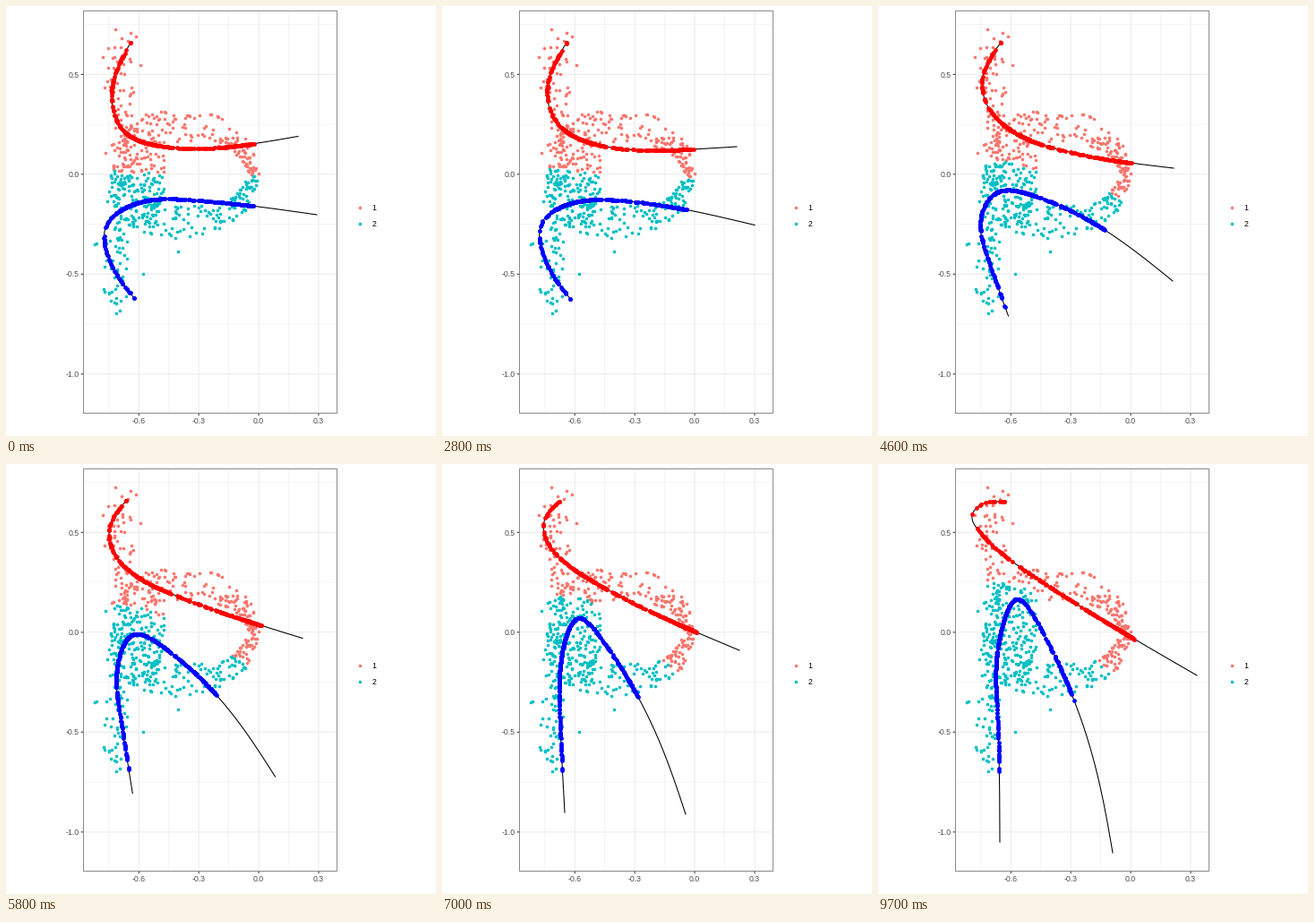
Recreate the animation shown at these times as a matplotlib script. Size 480 by 480 pixels, loop 10000 ms.

```python
import matplotlib.pyplot as plt
import numpy as np
from matplotlib.animation import FuncAnimation

SIZE, DPI = 480, 96
PX = 72 / DPI                       # points per pixel
X0, Y0, UNIT = 282.1, 187.8, 223.0  # pixel position of (0, 0), pixels per unit
LEFT, RIGHT, TOP, BOTTOM = 86.5, 369.5, 5.5, 454.5
GROUPS = [("#F8766D", "#FF0000"), ("#00BFC4", "#0000FF")]

# Progress through the poses against the iteration, settling at the end
STEPS = [0, 7, 12, 20, 24, 26, 29]
PROGRESS = [0, 1, 2, 3, 3.85, 3.98, 4]

# Knots of the two curves in each pose, in pixels
UPPER = np.array([
    [(139, 41), (118, 95), (131, 139), (174, 156.5), (245, 157.5), (326, 145.5)],
    [(139, 41), (117.5, 92), (128, 130), (165, 152.5), (235, 161), (329, 157)],
    [(137, 41), (117, 78), (121, 109), (146, 137), (205, 161), (330, 181)],
    [(131, 41.5), (115, 61), (113.5, 75), (125, 98), (165, 129), (332, 208)],
    [(141, 42), (111, 48), (105, 58), (112, 74), (160, 116), (356, 236)],
])
LOWER = np.array([
    [(143, 326), (115, 283), (112, 245), (140, 222), (200, 216), (347, 233)],
    [(145, 329), (114, 281), (112, 241), (138, 222), (190, 216.5), (349, 244.5)],
    [(145.5, 346), (122, 280), (116, 231), (131, 209), (172, 211), (329, 307)],
    [(137, 389), (131, 270), (134, 212), (152, 172), (180, 198), (272, 391)],
    [(136, 422), (133, 275), (137, 188), (155, 151), (180, 181), (262, 434)],
])
OUTLIERS = [(122, 26), (145, 34), (150, 66), (99, 266), (101, 265),
            (153, 299), (192, 274), (282, 187), (123, 343)]


def observations(seed=3):
    """A tall strip, a dense core beside it and a ring that narrows to a tip."""
    rng = np.random.default_rng(seed)
    n = 165
    v = rng.uniform(-1, 1, n)
    strip = np.c_[127 - 4 * v**2 + 8 * rng.normal(size=n).clip(-2, 2),
                  185 + 155 * v]
    n = 200
    r, a = np.sqrt(rng.random(n)), rng.uniform(0, 2 * np.pi, n)
    core = np.c_[147 + 31 * r * np.cos(a), 192 + 62 * r * np.sin(a)]
    n = 270
    a = rng.uniform(-2.2, 2.2, n)
    r = 0.97 + rng.uniform(-1, 1, n) * (0.07 + 0.28 * np.sin(a)**2)
    ring = np.c_[195 + 82 * r * np.cos(a), 187 + 55 * r * np.sin(a)]
    return np.vstack([strip, core, ring, OUTLIERS])


def spline(p, n=700):
    """Natural cubic spline through p, parametrised by chord length."""
    h = np.hypot(*np.diff(p, axis=0).T)
    t = np.r_[0, np.cumsum(h)]
    a, b = np.eye(len(p)), np.zeros_like(p)
    for j in range(1, len(p) - 1):
        a[j, j - 1:j + 2] = h[j - 1], 2 * (h[j - 1] + h[j]), h[j]
        b[j] = 6 * ((p[j + 1] - p[j]) / h[j] - (p[j] - p[j - 1]) / h[j - 1])
    m = np.linalg.solve(a, b)
    u = np.linspace(0, t[-1], n)
    i = np.clip(np.searchsorted(t, u, side="right") - 1, 0, len(h) - 1)
    w = h[i][:, None]
    s = (u - t[i])[:, None] / w
    q = 1 - s
    return (q * p[i] + s * p[i + 1]
            + w**2 / 6 * ((q**3 - q) * m[i] + (s**3 - s) * m[i + 1]))


def curve(poses, k):
    u = np.interp(k, STEPS, PROGRESS)
    i = min(int(u), len(poses) - 2)
    return spline(poses[i] + (u - i) * (poses[i + 1] - poses[i]))


def iteration(ms):
    return ms // 400 if ms < 4000 else 10 + (ms - 4000) // 300


data = observations()

fig = plt.figure(figsize=(SIZE / DPI, SIZE / DPI), dpi=DPI, facecolor="white")
ax = fig.add_axes([0, 0, 1, 1])
ax.set(xlim=(0, SIZE), ylim=(SIZE, 0))
ax.axis("off")


def rule(xs, ys, color, width, z=1):
    ax.plot(xs, ys, color=color, lw=width * PX, zorder=z, snap=False,
            solid_capstyle="butt")


def label(x, y, text, ha, color="#4D4D4D"):
    ax.text(x, y + 3.2, text, ha=ha, va="baseline", color=color,
            fontsize=8.8 * PX, family="Liberation Sans")


def dots(size, z, color):
    return ax.scatter([], [], s=(size * PX) ** 2, linewidths=0, zorder=z,
                      color=color)


for v in np.arange(-0.75, 0.2, 0.3):
    rule([X0 + v * UNIT] * 2, [TOP, BOTTOM], "#EBEBEB", 0.53)
for v in np.arange(-0.75, 0.8, 0.5):
    rule([LEFT, RIGHT], [Y0 - v * UNIT] * 2, "#EBEBEB", 0.53)
for v in (-0.6, -0.3, 0, 0.3):
    x = X0 + v * UNIT
    rule([x, x], [TOP, BOTTOM], "#EBEBEB", 1.07)
    rule([x, x], [BOTTOM, BOTTOM + 2.75], "#333333", 1.07)
    label(x, 463.3, f"{v:.1f}", "center")
for v in (-1, -0.5, 0, 0.5):
    y = Y0 - v * UNIT
    rule([LEFT, RIGHT], [y, y], "#EBEBEB", 1.07)
    rule([LEFT - 2.75, LEFT], [y, y], "#333333", 1.07)
    label(81.6, y, f"{v:.1f}", "right")
rule([LEFT, RIGHT, RIGHT, LEFT, LEFT], [TOP, TOP, BOTTOM, BOTTOM, TOP],
     "#8A8A8A", 1, z=6)

layers = []
for i, (pale, strong) in enumerate(GROUPS):
    y = 225.2 + 17.3 * i
    dots(3.6, 2, pale).set_offsets([(394.5, y)])
    label(408.6, y, str(i + 1), "left", "black")
    line, = ax.plot([], [], color="black", lw=1.07 * PX, zorder=3)
    layers.append((dots(3.6, 2, pale), line, dots(4.8, 4, strong)))


def draw(frame):
    k = iteration(frame * 100)
    curves = [curve(poses, k) for poses in (UPPER, LOWER)]
    dist = [np.linalg.norm(data[:, None] - c[None], axis=2) for c in curves]
    owner = np.argmin([d.min(axis=1) for d in dist], axis=0)
    for i, (cloud, line, feet) in enumerate(layers):
        mine = owner == i
        cloud.set_offsets(data[mine])
        line.set_data(*curves[i].T)
        feet.set_offsets(curves[i][dist[i][mine].argmin(axis=1)])
    return [a for layer in layers for a in layer]


anim = FuncAnimation(fig, draw, frames=100, interval=100, repeat=True,
                     repeat_delay=0, init_func=lambda: draw(0))
plt.show()
```
